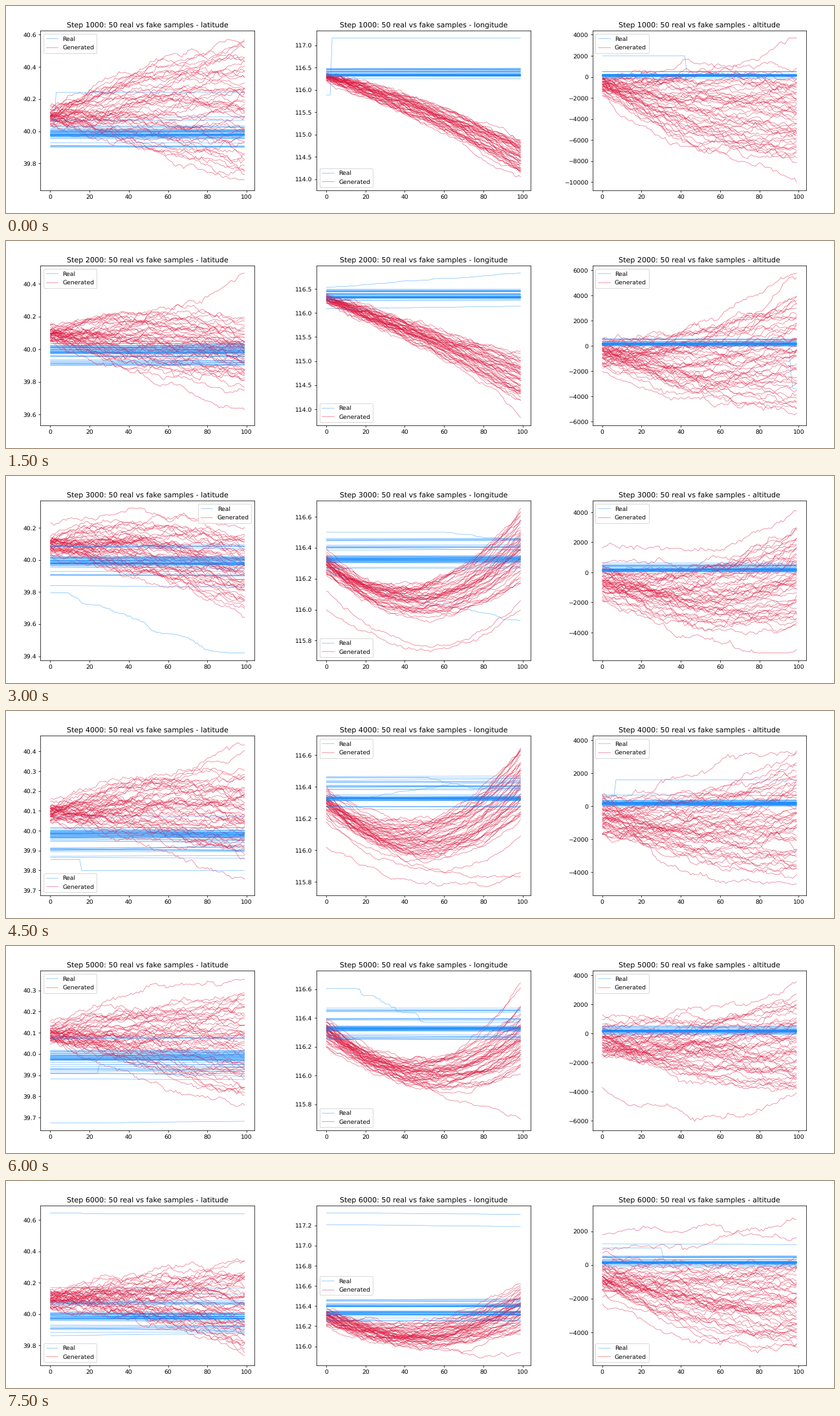
These frames come from a looping animation (1280x320 px, 8000 ms). A matplotlib script:

```python
import numpy as np
import matplotlib.pyplot as plt
from matplotlib.animation import FuncAnimation
from matplotlib.collections import LineCollection
from matplotlib.colors import to_rgba

SCALE = 5 / 6  # default point sizes, shrunk to the stage
SAMPLES = 50
LINE_WIDTH = 0.6 * SCALE
REAL, FAKE = to_rgba("dodgerblue", 0.75), to_rgba("crimson", 0.75)
T = np.arange(100)
U = T / 99

plt.rcParams.update({
    "font.family": "DejaVu Sans",
    "font.size": 10 * SCALE,
    "text.hinting": "none",
    "axes.linewidth": 0.8 * SCALE,
    "axes.titlepad": 6 * SCALE,
    "patch.linewidth": SCALE,
})
for side in "xy":
    plt.rcParams[f"{side}tick.major.size"] = 3.5 * SCALE
    plt.rcParams[f"{side}tick.major.pad"] = 3.5 * SCALE
    plt.rcParams[f"{side}tick.major.width"] = 0.8 * SCALE


class Quantity:
    """How real levels cluster and where generated paths begin."""

    def __init__(self, name, clusters, weights, width, start, start_width, roughness):
        self.name = name
        self.clusters, self.weights, self.width = clusters, weights, width
        self.start, self.start_width = start, start_width
        self.roughness = roughness


LATITUDE = Quantity("latitude", [39.977, 39.99, 40.01, 40.073, 39.91],
                    [0.35, 0.3, 0.1, 0.08, 0.17], 0.011, 40.093, 0.03, 0.0095)
LONGITUDE = Quantity("longitude", [116.326, 116.455, 116.4, 116.265],
                     [0.62, 0.15, 0.15, 0.08], 0.009, 116.3, 0.048, 0.0065)
ALTITUDE = Quantity("altitude", [150, 480], [0.92, 0.08], 65, -600, 700, 0.0095)

panels = []


def jitter(rng, sigma, keep=0.95):
    """Mean-reverting random walk starting at zero."""
    walk = np.zeros(len(T))
    for i, step in enumerate(rng.normal(0, sigma, len(T) - 1)):
        walk[i + 1] = keep * walk[i] + step
    return walk


def arc(start, middle, end):
    """Parabola through three evenly spaced heights."""
    return (start * (1 - U) * (1 - 2 * U) + 4 * middle * U * (1 - U)
            + end * U * (2 * U - 1))


def stairs(rng, before, after, begin, length):
    """Level line that moves to another level in uneven steps."""
    climb = np.cumsum(rng.random(length) ** 4)
    share = np.interp(T, begin + np.arange(length + 1), np.r_[0, climb / climb[-1]])
    return before + (after - before) * share


def fan(rank, low, high):
    z = np.sign(rank) * np.abs(rank) ** 1.2
    return (low + high) / 2 + (high - low) / 2 * z


def fake_lines(rng, kind, count, middle, end):
    ranks = np.linspace(-1, 1, count)
    order = np.argsort(ranks + rng.normal(0, 0.4, count))
    scatter = 0.4 * ranks + 0.9 * np.clip(rng.normal(size=count), -2, 2)
    starts = kind.start + kind.start_width * scatter
    return [arc(*heights) for heights in
            zip(starts, fan(ranks[np.argsort(order)], *middle), fan(ranks, *end))]


def real_lines(rng, kind, count):
    levels = rng.choice(kind.clusters, count, p=kind.weights)
    levels = levels + rng.laplace(0, kind.width, count)
    return [level + rng.laplace(0, kind.width / 3) * U ** rng.uniform(0.7, 2)
            for level in levels]


def add_panel(kind, limits, middle, end, fake=(), real=(), legend="upper left"):
    """fake: start, middle and end of strays; real: levels and timing of strays."""
    rng = np.random.default_rng(40 + len(panels))
    low, high = limits
    fakes = [arc(*heights) for heights in fake]
    fakes += fake_lines(rng, kind, SAMPLES - len(fake), middle, end)
    fakes = [y + jitter(rng, kind.roughness * (high - low)) for y in fakes]
    reals = [stairs(rng, *change) for change in real]
    reals += real_lines(rng, kind, SAMPLES - len(real))
    rng.shuffle(reals)
    rng.shuffle(fakes)
    margin = (high - low) / 20
    paths = [np.column_stack([T, np.clip(y, low, high)])
             for pair in zip(reals, fakes) for y in pair]
    panels.append((kind.name, (low - margin, high + margin), paths, legend))


# Step 1000
add_panel(LATITUDE, (39.679, 40.579), (39.87, 40.41), (39.72, 40.56),
          real=[(40.05, 40.243, 2, 1)])
add_panel(LONGITUDE, (113.912, 117.158), (115.3, 115.75), (114.15, 114.9),
          fake=[(116.2, 115.3, 113.95)], real=[(115.88, 117.158, 2, 1)],
          legend="lower left")
add_panel(ALTITUDE, (-10098, 3686), (-6400, 900), (-7800, 700),
          fake=[(-500, 300, 3600), (-1500, -6200, -9900)], real=[(2000, 500, 42, 1)])

# Step 2000
add_panel(LATITUDE, (39.578, 40.465), (39.88, 40.23), (39.78, 40.17),
          fake=[(40.12, 40.2, 40.44), (40.05, 39.8, 39.6)])
add_panel(LONGITUDE, (113.817, 116.828), (115.3, 115.73), (114.2, 115.1),
          fake=[(116.2, 115.3, 113.85)],
          real=[(116.53, 116.828, 0, 98), (116.09, 116.14, 0, 98)],
          legend="lower left")
add_panel(ALTITUDE, (-5723, 5764), (-3800, 1400), (-4700, 4000),
          fake=[(500, 1500, 5600), (300, 1000, 5300), (-2000, -4400, -5200)],
          real=[(150, -3400, 95, 2)])

# Step 3000
add_panel(LATITUDE, (39.42, 40.3226), (39.89, 40.22), (39.69, 40.16),
          fake=[(40.23, 40.27, 40.1)],
          real=[(39.795, 39.42, 8, 85), (39.84, 39.83, 0, 98)], legend="upper right")
add_panel(LONGITUDE, (115.72, 116.656), (115.97, 116.18), (116.17, 116.64),
          fake=[(116.0, 115.74, 115.99), (116.12, 115.79, 116.05)],
          real=[(116.5, 116.455, 60, 35), (116.25, 115.93, 0, 98)], legend="lower left")
add_panel(ALTITUDE, (-5359, 4275), (-3500, 700), (-3700, 3000),
          fake=[(1600, 1700, 4200), (-800, -4500, -4400)])

# Step 4000
add_panel(LATITUDE, (39.711, 40.442), (39.96, 40.26), (39.88, 40.29),
          fake=[(40.12, 40.25, 40.43), (40.1, 40.22, 40.37), (40.05, 39.92, 39.75)],
          real=[(39.855, 39.8, 15, 1)], legend="lower left")
add_panel(LONGITUDE, (115.761, 116.675), (115.95, 116.19), (116.19, 116.65),
          fake=[(116.02, 115.79, 115.83), (116.18, 115.86, 115.85), (116.2, 115.88, 116.06)],
          real=[(116.46, 116.39, 50, 25), (116.33, 116.42, 20, 50)])
add_panel(ALTITUDE, (-4965, 3820), (-3300, 800), (-4300, 2600),
          fake=[(500, 900, 3750), (-200, 1900, 3000), (-900, -3700, -4700)],
          real=[(600, 1600, 6, 1)])

# Step 5000
add_panel(LATITUDE, (39.674, 40.3577), (39.93, 40.22), (39.8, 40.29),
          fake=[(40.12, 40.28, 40.34), (40.06, 39.87, 39.79)],
          real=[(39.674, 39.682, 25, 73), (39.908, 39.95, 24, 1)])
add_panel(LONGITUDE, (115.671, 116.678), (115.93, 116.11), (116.03, 116.46),
          fake=[(116.3, 116.05, 116.66), (116.4, 116.1, 116.6), (116.2, 115.92, 115.7)],
          real=[(116.605, 116.37, 15, 36)], legend="lower left")
add_panel(ALTITUDE, (-6160, 3796), (-3100, 1000), (-3900, 2000),
          fake=[(1300, 1400, 3650), (500, 700, 2800), (-3700, -5700, -4300)])

# Step 6000
add_panel(LATITUDE, (39.721, 40.643), (39.95, 40.24), (39.76, 40.31),
          real=[(40.643, 40.638, 15, 12), (39.863, 39.88, 0, 98), (40.17, 40.165, 0, 98)],
          legend="lower left")
add_panel(LONGITUDE, (115.885, 117.322), (115.99, 116.23), (116.14, 116.6),
          fake=[(116.25, 115.94, 115.94)],
          real=[(117.322, 117.31, 20, 70), (117.205, 117.19, 20, 70)],
          legend="center left")
add_panel(ALTITUDE, (-5518, 3070), (-3800, 0), (-4800, 400),
          fake=[(1800, 1900, 2000), (900, 1400, 2950), (-2300, -4800, -5200)],
          real=[(1250, 1200, 0, 98), (1000, 450, 30, 1)], legend="lower left")

fig = plt.figure(figsize=(16, 4), dpi=80, facecolor="white")
axes = [fig.add_axes([(i + 0.125) / 3, 0.11, 0.775 / 3, 0.77]) for i in range(3)]


def draw(frame):
    scene = frame // 3
    for ax, (name, limits, paths, legend) in zip(axes, panels[3 * scene:3 * scene + 3]):
        ax.clear()
        for label, color in (("Real", REAL), ("Generated", FAKE)):
            ax.plot([], [], color=color, lw=LINE_WIDTH, label=label)
        ax.add_collection(LineCollection(paths, colors=[REAL, FAKE] * SAMPLES,
                                         linewidths=LINE_WIDTH))
        ax.set_xlim(-4.95, 103.95)
        ax.set_ylim(*limits)
        ax.set_title(f"Step {1000 * (scene + 1)}: {SAMPLES} real vs fake samples - {name}")
        ax.legend(loc=legend)
    return []


animation = FuncAnimation(fig, draw, frames=16, interval=500, repeat=True,
                          init_func=lambda: [])
plt.show()
```
